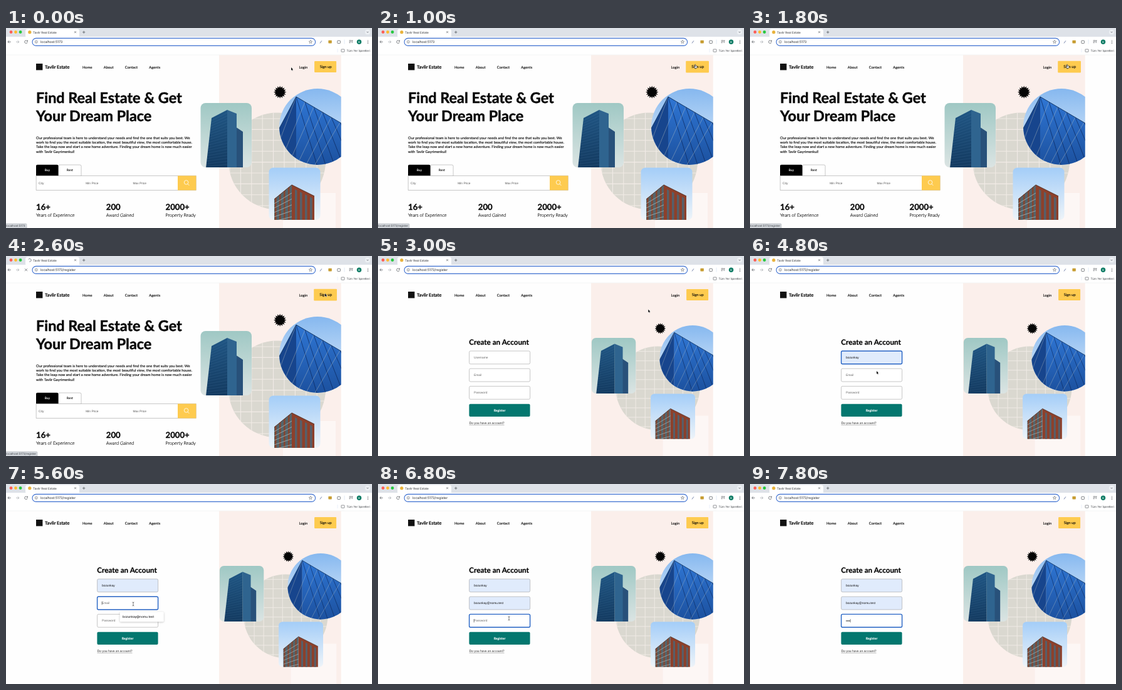
Write an HTML page with a canvas that moves like this. It is 584 px wide and 320 px high and loops after 8 s.

```html
<!DOCTYPE html>
<html lang="en">
<head>
<meta charset="utf-8">
<title>Tavlir Real Estate</title>
<style>
  html, body { margin: 0; width: 100%; height: 100%; overflow: hidden; background: #fff; }
  canvas { display: block; width: 584px; height: 320px; }
</style>
</head>
<body>
<canvas id="stage"></canvas>
<script>
const W = 584, H = 320, LOOP = 8000, STEP = 200;
const REM = 5.85, INPUT = REM * 0.833;
const LATO = 'Lato, sans-serif';
const ARIAL = '"Liberation Sans", Arial, sans-serif';
const UI = 'Inter, sans-serif';
const YELLOW = '#fecb4f', INK = '#080808', GREY = '#4b4f55', BLUE = '#2462c4';
const USER = 'bozunkay', MAIL = 'bozunkay@nomu.test';

// Moments of the story, in ms
const HOVER = 800, CLICK = 2000, FORM = 3000, TYPING = 7200;
const FIELDS = [
  { label: 'Username', value: USER, focus: 3800, fill: 4600, menu: 57.2 },
  { label: 'Email', value: MAIL, focus: 5400, fill: 6200, menu: 70.2 },
  { label: 'Password', value: '', focus: 6600, fill: LOOP }
];
const MOVES = [
  { from: 0, to: 800, x: 506.5, y: 61 },
  { from: 1800, to: 2200, x: 509, y: 60 },
  { from: 2600, to: 3800, x: 209, y: 158.5 },
  { from: 4000, to: 4400, x: 202, y: 184 },
  { from: 4800, to: 5400, x: 203, y: 192 },
  { from: 5600, to: 6600, x: 209, y: 215 }
];

const canvas = document.getElementById('stage');
const ctx = canvas.getContext('2d');
const ratio = Math.max(1, window.devicePixelRatio || 1);
canvas.width = W * ratio;
canvas.height = H * ratio;

const mix = (a, b, k) => a + (b - a) * k;
const times = (n, fn) => { for (let i = 0; i < n; i++) fn(i); };

// Returns the width of the text; Lato is thickened slightly
function text(str, x, y, size, { font = LATO, weight = 400, color = INK, align = 'left' } = {}) {
  ctx.font = `${weight} ${size}px ${font}`;
  ctx.fillStyle = ctx.strokeStyle = color;
  ctx.textAlign = align;
  ctx.fillText(str, x, y);
  if (font === LATO) {
    ctx.lineWidth = size * 0.02;
    ctx.strokeText(str, x, y);
  }
  return ctx.measureText(str).width;
}

function stroke(color, lw) {
  ctx.strokeStyle = color;
  ctx.lineWidth = lw;
  ctx.stroke();
}

function rect(x, y, w, h, fill, radius = 0, edge, lw = 0.5) {
  ctx.beginPath();
  ctx.roundRect(x, y, w, h, radius);
  if (fill) { ctx.fillStyle = fill; ctx.fill(); }
  if (edge) stroke(edge, lw);
}

function disc(x, y, r, fill) {
  ctx.beginPath();
  ctx.arc(x, y, r, 0, Math.PI * 2);
  ctx.fillStyle = fill;
  ctx.fill();
}

function ring(x, y, r, color, lw, from = 0, sweep = Math.PI * 2) {
  ctx.beginPath();
  ctx.arc(x, y, r, from, from + sweep);
  stroke(color, lw);
}

function trace(points, close) {
  ctx.beginPath();
  for (let i = 0; i < points.length; i += 2) ctx.lineTo(points[i], points[i + 1]);
  if (close) ctx.closePath();
}

function poly(fill, ...points) {
  trace(points, true);
  ctx.fillStyle = fill;
  ctx.fill();
}

function line(color, lw, ...points) {
  trace(points);
  stroke(color, lw);
}

function star(x, y, outer, inner, count) {
  const points = [];
  times(count * 2, i => {
    const r = i % 2 ? inner : outer, a = i * Math.PI / count - Math.PI / 2;
    points.push(x + r * Math.cos(a), y + r * Math.sin(a));
  });
  return points;
}

function fade(y0, y1, top, bottom) {
  const g = ctx.createLinearGradient(0, y0, 0, y1);
  g.addColorStop(0, top);
  g.addColorStop(1, bottom);
  return g;
}

function clipped(shape, draw) {
  ctx.save();
  ctx.beginPath();
  shape();
  ctx.clip();
  draw();
  ctx.restore();
}

// Browser frame

function cross(x, y, r) {
  line(GREY, 0.65, x - r, y - r, x + r, y + r);
  line(GREY, 0.65, x - r, y + r, x + r, y - r);
}

function arrow(x, y, dir, color) {
  line(color, 0.7, x - 2.4, y, x + 2.4, y);
  line(color, 0.7, x + dir * 0.2, y - 2.2, x + dir * 2.4, y, x + dir * 0.2, y + 2.2);
}

function tabStrip(loading, t) {
  rect(0, 0, W, 14, '#dee2e8');
  ['#fe5f57', '#febc2e', '#28c840'].forEach((c, i) => disc(8 + i * 7.5, 6.5, 2.4, c));
  rect(31, 1.5, 86, 14, '#fff', 3.5);
  if (loading) ring(37.8, 6.7, 2.4, '#7f868f', 1, t / 160, 4.4);
  else disc(37.8, 6.7, 2.6, '#e9b23c');
  text('Tavlir Real Estate', 43, 8.6, 4.7, { font: UI, color: '#2c2f33' });
  cross(110.5, 6.6, 1.5);
  line(GREY, 0.7, 122, 6.7, 126.4, 6.7);
  line(GREY, 0.7, 124.2, 4.5, 124.2, 8.9);
  disc(577, 6.5, 4.1, '#edf0f4');
  line(GREY, 0.7, 575.5, 5.8, 577, 7.3, 578.5, 5.8);
}

function toolbar(url, loading) {
  const y = 22.2;
  rect(0, 14, W, 29, '#fff');
  arrow(5.4, y, -1, GREY);
  arrow(18.4, y, 1, '#9da1a6');
  if (loading) cross(32, y, 2);
  else {
    ring(32, y, 2.3, GREY, 0.7, 0.2, 5.2);
    poly(GREY, 32.6, 21.6, 34.8, 21.6, 34.8, 19.2);
  }

  rect(42, 16.4, 451.6, 12, '#fff', 6, '#3c6fd0', 1.1);
  ring(48.3, y, 2, GREY, 0.55);
  line(GREY, 0.5, 48.3, 21.8, 48.3, 23.3);
  text(url, 55, 24.2, 5.25, { font: UI, color: '#24272b' });
  trace(star(486, y, 2.8, 1.2, 5), true);
  stroke(GREY, 0.5);

  line('#7785ab', 1, 501, 24.4, 503.8, 20.4);
  rect(514.4, 19.8, 5.4, 4.8, '#c79c30', 0.8);
  rect(528.8, 20.2, 4.6, 4.4, null, 0.8, GREY, 0.7);
  line('#cfdcee', 0.6, 540, 18.6, 540, 25.6);
  times(3, i => {
    line(GREY, 0.7, 547.6, 20 + i * 1.8, 551.6 - i, 20 + i * 1.8);
    disc(577.5, 20 + i * 2.2, 0.6, GREY);
  });
  line(GREY, 0.7, 553.6, 20, 552.2, 20, 552.2, 24);
  disc(563.5, y, 3.7, '#0b7a63');
  text('B', 563.5, 23.8, 4.4, { font: UI, color: '#fff', align: 'center' });

  line('#d3dff0', 0.5, 529, 33, 529, 39);
  rect(535, 34, 5, 4.2, null, 0.5, GREY, 0.6);
  text('Tüm Yer İşaretleri', 543.6, 38, 4.5, { font: UI, color: '#3a3d42' });
  line('#e6e8eb', 0.5, 0, 43, W, 43);
}

function status(str) {
  rect(-2, 313, str.length > 14 ? 52 : 35, 9, '#d3d7dc', 1.5, '#a9adb2', 0.5);
  text(str, 0.2, 318.4, 4.5, { font: UI, color: '#3d4146' });
}

// Illustration

// One face of a building, its left edge leaning out at the base
function wall(fill, x0, y0, x1, y1, base, lean = 0) {
  poly(fill, x0, y0, x1, y1, x1, base, x0 - lean, base);
}

function tower() {
  clipped(() => ctx.roundRect(310.5, 120, 81.5, 103, 8), () => {
    rect(310, 120, 83, 104, fade(120, 223, '#9fc8c4', '#dbe4e3'));
    wall('#28517a', 366, 158, 378, 166, 224);
    wall('#2f648f', 353, 131, 368, 137, 224);
    wall(fade(131, 223, '#205684', '#133a60'), 328, 144, 353, 131, 224, 9);
    times(18, i => {
      const k = (i + 1) / 19;
      line('rgba(130,175,215,.22)', 0.5, 328 - 9 * k, mix(144, 226, k), 353, mix(131, 223, k));
    });
  });
}

function glassBlock() {
  clipped(() => ctx.arc(497, 158, 61, 0, 7), () => {
    rect(436, 96, 100, 124, fade(97, 180, '#86b8ef', '#c9e0f8'));
    wall('#17458d', 430, 172, 463, 110, 222);
    wall(fade(110, 219, '#2f76d4', '#1c519f'), 463, 110, 536, 153, 222);
    times(6, i => {
      const x = 463 + i * 14, y = 110 + i * 8.2;
      line('rgba(215,215,200,.6)', 0.6, x, y, x - 42, 222);
      line('rgba(10,35,85,.75)', 0.9, x, y, x + 34, 222);
    });
    line('#123766', 1, 430, 172, 463, 110, 536, 153);
  });
}

function brickBlock() {
  clipped(() => ctx.roundRect(419.5, 223.5, 82, 83.5, 7), () => {
    rect(419, 223, 83, 85, fade(223, 307, '#a3cdf8', '#eef4f9'));
    wall('#53646b', 428, 274, 456, 251, 308);
    wall('#8d402b', 456, 251, 492, 269, 308);
    times(4, i => {
      const x = 429 + i * 7;
      wall('#85452f', x, 273 - i * 5.7, x + 2.6, 271 - i * 5.7, 308);
      wall('#56606a', 461 + i * 8, 258 + i * 4, 464.5 + i * 8, 260 + i * 4, 308);
    });
    times(5, i => line('#a8b6b8', 0.8, 428, 281 + i * 7, 456, 264 + i * 9.5));
    line('#5a3326', 1, 428, 274, 456, 251, 492, 269);
  });
}

function gridDisc() {
  clipped(() => ctx.arc(432.5, 213, 77.5, 0, 7), () => {
    rect(354, 134, 158, 158, '#dad8d0');
    times(10, i => {
      const d = i * 17.4;
      line('#f1ebe6', 1.1, 357 + d, 134, 357 + d, 292);
      line('#f1ebe6', 1.1, 354, 145 + d, 512, 145 + d);
    });
  });
}

function artwork(scale) {
  const right = 534.7;
  rect(340, 43.3, right - 340, 277, '#fbefeb');
  clipped(() => ctx.rect(300, 43, right - 300, 277), () => {
    ctx.translate(535 * (1 - scale), 201.5 * (1 - scale));
    ctx.scale(scale, scale);
    rect(442, 264, 84, 90, '#fdf7f5');
    gridDisc();
    tower();
    glassBlock();
    brickBlock();
    poly('#050505', ...star(437.2, 102.6, 10.2, 7, 16));
  });
}

// Pages

function header(hover) {
  rect(48, 57, 10.4, 10.4, '#111');
  text('Tavlir Estate', 62, 65.1, REM * 1.25, { weight: 700 });
  let x = 122;
  for (const item of ['Home', 'About', 'Contact', 'Agents']) x += text(item, x, 64.5, REM) + 18.2;
  text('Login', 467.4, 64.5, REM);
  ctx.save();
  ctx.translate(509.6, 62.1);
  if (hover) ctx.scale(1.05, 1.05);
  rect(-17.5, -9, 35, 18, YELLOW, 1);
  text('Sign up', 0.6, 1.4, REM, { align: 'center' });
  ctx.restore();
}

function searchBar() {
  rect(83.5, 219, 36.5, 18, '#fff', [2, 2, 0, 0], '#777', 0.4);
  rect(48, 218.8, 35.5, 17.6, '#000', [2, 2, 0, 0]);
  text('Buy', 65.8, 229.3, INPUT, { color: '#fff', align: 'center' });
  text('Rent', 101.8, 229.3, INPUT, { align: 'center' });
  rect(48.2, 236.4, 255, 23.2, '#fff', 0, '#8c8c8c', 0.5);
  ['City', 'Min Price', 'Max Price'].forEach((s, i) =>
    text(s, 52 + i * 75.2, 249.8, INPUT, { font: ARIAL, color: '#555' }));
  rect(274, 236.4, 29.4, 23.2, YELLOW);
  ring(287.6, 247, 3.3, '#fff', 0.8);
  line('#fff', 0.8, 290, 249.5, 292.4, 252);
}

function home() {
  ['Find Real Estate & Get', 'Your Dream Place'].forEach((s, i) =>
    text(s, 48, 120.2 + i * 28.4, REM * 4, { weight: 700 }));
  [
    'Our professional team is here to understand your needs and find the one that suits you best. We',
    'work to find you the most suitable location, the most beautiful view, the most comfortable house.',
    'Take the leap now and start a new home adventure. Finding your dream home is now much easier',
    'with Tavlir Gayrimenkul!'
  ].forEach((s, i) => text(s, 48, 178.3 + i * 7.08, REM));
  searchBar();

  let x = 48;
  for (const [count, label] of [['16+', 'Years of Experience'], ['200', 'Award Gained'], ['2000+', 'Property Ready']]) {
    text(count, x, 291.2, REM * 2.25, { weight: 700 });
    x += text(label, x, 301.5, REM * 1.25, { weight: 300 }) + 50.3;
  }
}

function field({ label, value, fill }, y, focused, typed, t) {
  const filled = t >= fill;
  rect(145.6, y, 97, 20.8, filled ? '#e0ebfc' : '#fff', 2, focused ? BLUE : '#858585', focused ? 1.4 : 0.45);
  if (!typed) text(filled ? value : label, 153, y + 12, INPUT, { font: ARIAL, color: filled ? '#111' : '#666' });
  times(typed, i => disc(153.9 + i * 1.72, y + 10.6, 0.72, '#111'));
  if (focused && !filled) {
    const x = 153.2 + typed * 1.72;
    line('#111', 0.5, x, y + 7.6, x, y + 13.2);
  }
}

function suggestion(y, str, width) {
  ctx.save();
  ctx.shadowColor = 'rgba(0,0,0,.25)';
  ctx.shadowBlur = 3 * ratio;
  ctx.shadowOffsetY = 0.6 * ratio;
  rect(181.6, y, width, 16, '#fff', 1.6);
  ctx.restore();
  text(str, 186, y + 9.6, 4.8, { font: UI, weight: 500, color: '#1c1c1e' });
}

function register(t) {
  const focus = FIELDS.filter(f => t >= f.focus).length - 1;
  const typed = t < TYPING ? 0 : 1 + (t - TYPING) / STEP;
  const rowY = i => 152 + i * 28.2;

  text('Create an Account', 145.3, 142.2, REM * 2, { weight: 700 });
  FIELDS.forEach((f, i) => field(f, rowY(i), i === focus, i === 2 ? typed : 0, t));
  rect(145.4, 236.8, 97.2, 20.2, '#04776f', 2);
  text('Register', 194, 248.7, REM * 0.88, { weight: 700, color: '#fff', align: 'center' });
  const width = text('Do you have an account?', 145.4, 269.4, REM * 0.875, { color: '#555' });
  line('#777', 0.45, 145.4, 270.5, 145.4 + width, 270.5);

  const current = FIELDS[focus];
  if (current && current.menu && t < current.fill) suggestion(rowY(focus) + 24.4, current.value, current.menu);
}

// Pointer

function pointerAt(t) {
  let x = 455, y = 63;
  for (const m of MOVES) {
    const k = Math.min(1, Math.max(0, (t - m.from) / (m.to - m.from)));
    const eased = k * k * (3 - 2 * k);
    x = mix(x, m.x, eased);
    y = mix(y, m.y, eased);
  }
  return [x, y];
}

function pointer(x, y, kind) {
  ctx.save();
  ctx.translate(x, y);
  if (kind === 'text') {
    line('#222', 0.6, 0, -2.6, 0, 2.6);
    for (const s of [-1, 1]) line('#222', 0.6, -1.4, s * 3, 0, s * 2.4, 1.4, s * 3);
  } else if (kind === 'hand') {
    rect(-1.8, -0.4, 4.4, 3.6, '#fff', 1.2, '#222', 0.6);
    rect(-1, -2.8, 1.3, 4, '#fff', 0.6, '#222', 0.6);
  } else {
    const shape = [0, 0, 0, 4.8, 1.1, 3.8, 1.9, 5.5, 2.6, 5.2, 1.9, 3.5, 3.3, 3.4];
    trace(shape, true);
    stroke('#fff', 0.8);
    poly('#111', ...shape);
  }
  ctx.restore();
}

function pointerKind(t) {
  if (t >= HOVER && t < CLICK) return 'hand';
  const overMenu = FIELDS.some(f => t >= f.fill - STEP && t < f.fill + 2 * STEP);
  return t < 3600 || overMenu ? 'arrow' : 'text';
}

function draw(t) {
  const onForm = t >= FORM;
  const loading = t >= CLICK && !onForm;
  const address = from => 'localhost:5173' + (t >= from ? '/register' : '');

  ctx.setTransform(ratio, 0, 0, ratio, 0, 0);
  ctx.textRendering = 'geometricPrecision';
  ctx.lineJoin = 'round';
  rect(0, 0, W, H, '#fefefe');
  artwork(onForm ? 0.865 : 1);
  header(t >= HOVER && !onForm);
  if (onForm) register(t);
  else home();
  tabStrip(loading, t);
  toolbar(address(CLICK), loading);
  if (!onForm) status(address(HOVER));
  if (t < TYPING) pointer(...pointerAt(t), pointerKind(t));
}

const start = performance.now();
function tick() {
  const t = (performance.now() - start) % LOOP;
  draw(Math.floor(t / STEP) * STEP);
  requestAnimationFrame(tick);
}
tick();
</script>
</body>
</html>
```
